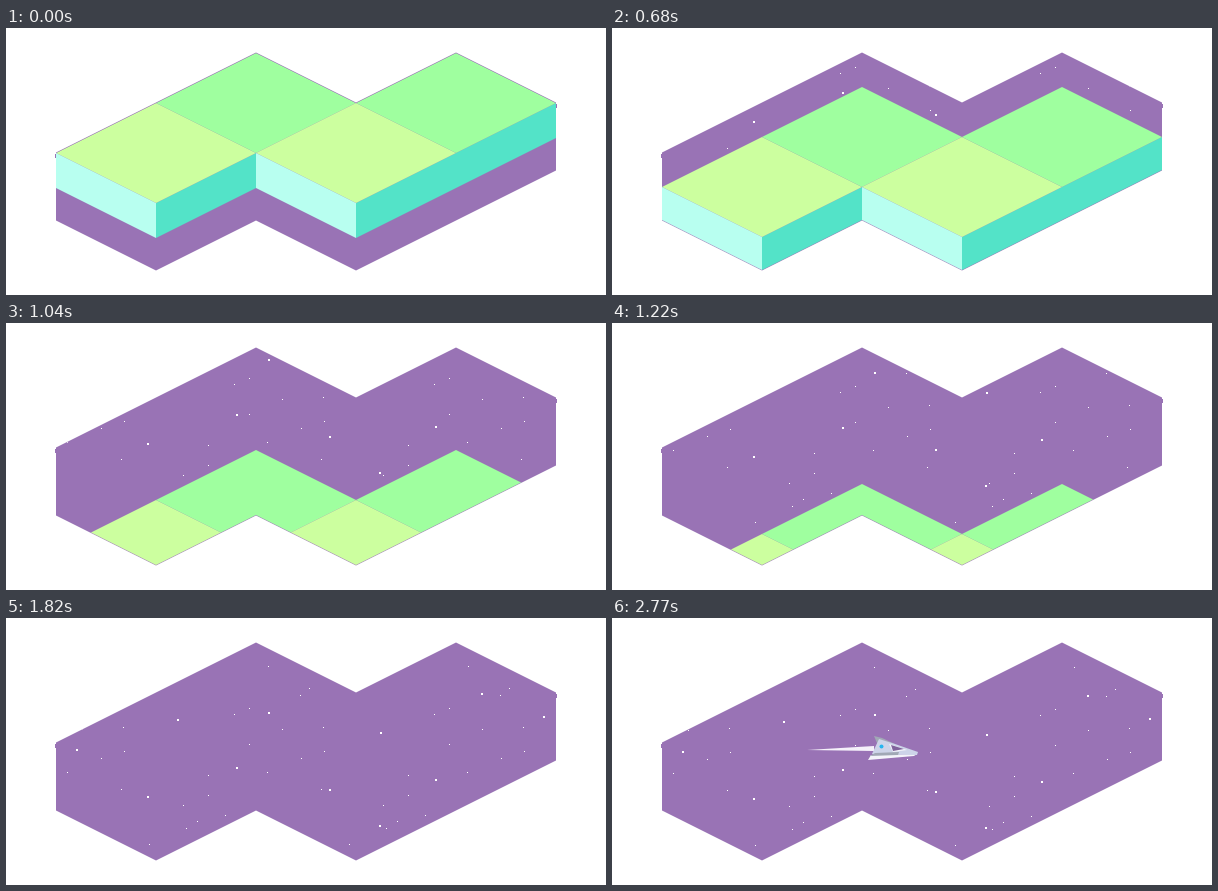
These frames come from a looping animation (600 px wide and 267 px high, 2.8 s). An HTML page with a canvas:

```html
<!DOCTYPE html>
<html lang="en">
<head>
<meta charset="utf-8">
<title>Isometric tiles and starship</title>
<style>
html, body { margin: 0; width: 100%; height: 100%; overflow: hidden; background: #fff; }
canvas { display: block; }
</style>
</head>
<body>
<canvas id="stage" width="600" height="267"></canvas>
<script>
const ctx = document.getElementById('stage').getContext('2d');
const LOOP = 2800, STEP = 30, FALL_START = 530, FALL_STEPS = 45;
const SHIP_START = 2380, SHIP_STEPS = 13;
const SPACE = '#9973b5';

const outline = new Path2D('M50 125L250 25 350 75 450 25 550 75V142L350 242 250 192 150 242 50 192Z');

// Small stars: a seeded scatter, repeated every 200 px across.
let seed = 11;
const random = () => (seed = seed * 16807 % 2147483647) / 2147483647;
const smallStars = Array.from({ length: 21 }, (_, i) => ({
  x: Math.floor(random() * 200),
  y: Math.floor(40 + (i + random()) * 9)
}));

// Large stars: key points of the resting sky.
const largeStars = [
  [71, 134], [142, 181], [172, 104], [231, 152], [263, 97], [324, 174],
  [375, 117], [374, 210], [430, 164], [476, 78], [538, 101]
];

function shape(color, d) {
  ctx.fillStyle = color;
  ctx.fill(new Path2D(d));
}

function drawSpace() {
  ctx.fillStyle = SPACE;
  // Two shifted fills keep the slanted edges solid.
  for (const dy of [-0.5, 0.5]) {
    ctx.save();
    ctx.translate(0, dy);
    ctx.fill(outline);
    ctx.restore();
  }
  ctx.fillRect(49, 126, 1, 4);
  ctx.fillRect(550, 76, 1, 4);
}

function drawStars(left) {
  ctx.fillStyle = '#fff';
  const smallShift = Math.round(60 * left), largeShift = Math.round(100 * left);
  for (const { x, y } of smallStars)
    for (let dx = 0; dx < 600; dx += 200) ctx.fillRect(x + dx, y - smallShift, 1, 1);
  for (const [x, y] of largeStars) ctx.fillRect(x - 1, y - 1 - largeShift, 2, 2);
}

function drawBlock(x, depth) {
  const tile = 'l100 -50 100 50 -100 50Z';
  shape('#53e3c8', `M${x + 100} 175l${100 * depth} ${-50 * depth}v35l${-100 * depth} ${50 * depth}Z`);
  shape('#ccff9f', `M${x} 125${tile}`);
  shape('#9fff9f', `M${x + 100} 75${tile}`);
  shape('#b8fff0', `M${x} 125l100 50v35l-100 -50Z`);
}

function drawTiles(offset) {
  ctx.save();
  ctx.translate(0, offset);
  drawBlock(50, 1);
  drawBlock(250, 2);
  ctx.restore();
}

function drawShip(offset) {
  ctx.save();
  ctx.translate(offset, 0);
  shape('#f5f1fa', 'M195 132L262 128V133Z');                  // trail
  shape('#a1a8b5', 'M262 118L270 120 283 126 265 125Z');      // far fin
  shape('#f4f4fa', 'M256 142L259 137 305 136 302 138Z');      // near wing
  shape('#cdd4e9', 'M267 121L283 126 306 134 305 137 260 136Z'); // hull
  shape('#a1a8b5', 'M258 138L263 135 287 134 286 137Z');      // shadow
  shape('#f4f4fa', 'M277 126L295 132 281 134Z');              // canopy
  shape('#80639c', 'M279 127L292 131 281 133Z');
  shape('#25b5ef', 'M267.5 128.5a2 2 0 1 0 4 0a2 2 0 1 0 -4 0Z');
  ctx.restore();
}

function render(t) {
  const fall = Math.max(0, Math.min(FALL_STEPS, Math.floor((t - FALL_START) / STEP) + 1));
  const flight = Math.floor((t - SHIP_START) / STEP) / SHIP_STEPS;
  ctx.fillStyle = '#fff';
  ctx.fillRect(0, 0, 600, 267);
  drawSpace();
  ctx.save();
  ctx.clip(outline);
  drawStars(1 - fall / FALL_STEPS);
  drawTiles(Math.round(fall * 17 / 3));
  if (flight >= 0) drawShip((flight - 1) * 253);
  ctx.restore();
}

function tick() {
  render(performance.now() % LOOP);
  requestAnimationFrame(tick);
}
tick();
</script>
</body>
</html>
```
